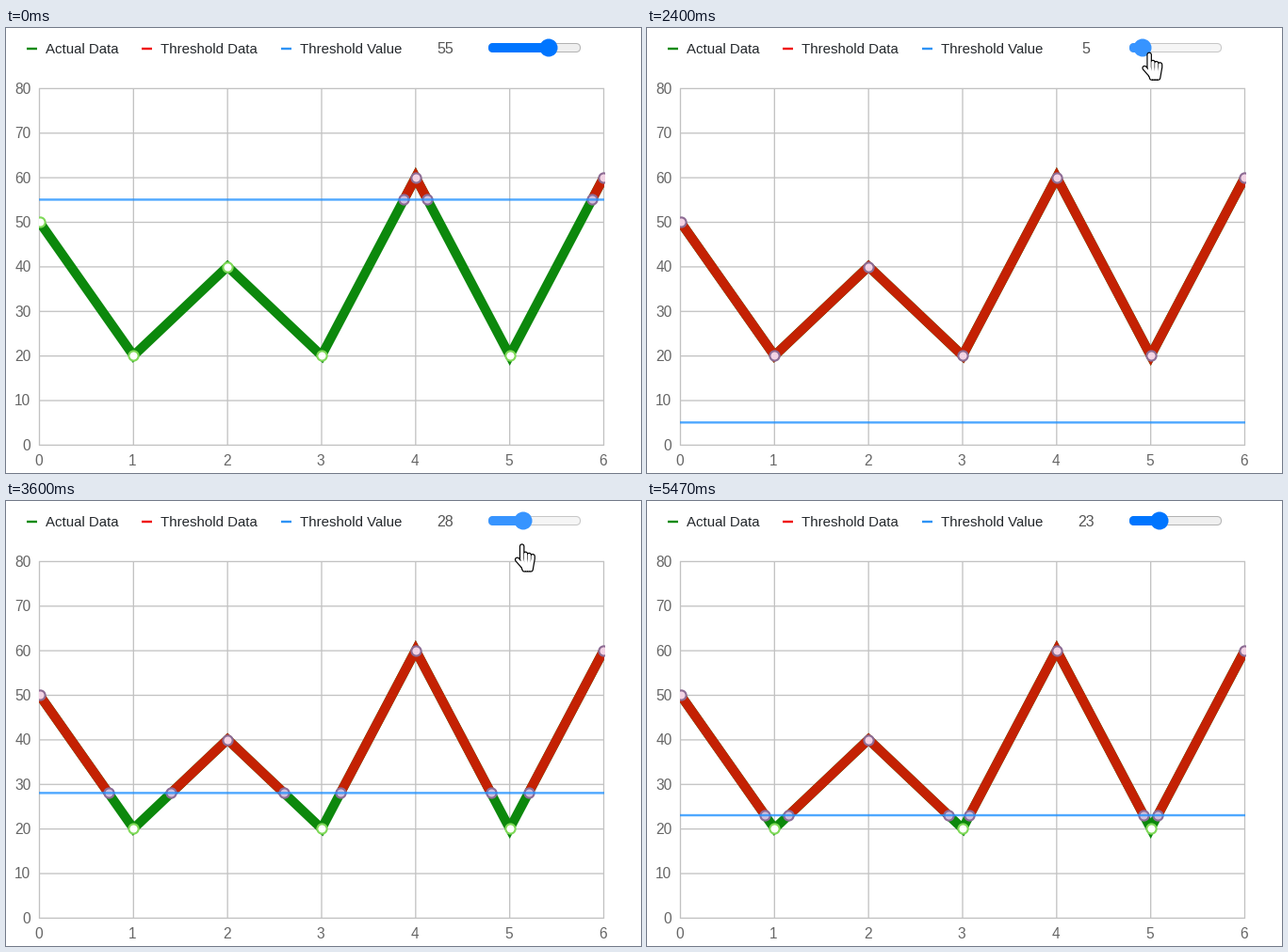
Write a matplotlib script that moves like this. It is 674 by 473 pixels and loops after 7140 ms.

```python
import numpy as np
import matplotlib.pyplot as plt
from matplotlib.animation import FuncAnimation
from matplotlib.patches import Circle, FancyBboxPatch, Polygon, Rectangle

WIDTH, HEIGHT, DPI = 674, 473, 100
LOOP_MS, INTERVAL = 7140, 30
PX = 72 / DPI

plt.rcParams["font.family"] = "Liberation Sans"
fig = plt.figure(figsize=(WIDTH / DPI, HEIGHT / DPI), dpi=DPI, facecolor="white")
ax = fig.add_axes([0, 0, 1, 1])
ax.set(xlim=(0, WIDTH), ylim=(HEIGHT, 0))
ax.axis("off")

DATA_Y = np.array([50, 20, 40, 20, 60, 20, 60])
DATA_X = np.arange(len(DATA_Y))

# The pointer is sampled 15 times per second; all times below are in these ticks
ENTER, HOVER, PRESS, RELEASE, LEAVE = 17, 20, 22, 80, 82
DRAG = [(23.2, 55), (34, 1), (34.7, 1), (43, 62), (46, 50), (48, 50), (58, 17),
        (63, 50), (65, 45), (68, 45), (72, 39), (76, 21), (77, 23)]
POINTER_Y = [(17, 44), (21, 22), (34, 23), (49, 42), (61, 50), (77, 58)]

BLUE, HOVER_BLUE, ACTIVE_BLUE = "#0075ff", "#005cc8", "#3794ff"
GREEN, RED, LINE_BLUE = "#0c880c", "#c42103", "#1e90ff"
GAP = (np.nan, np.nan)
ARROW = np.array([(0, 0), (0, 16), (4.5, 12.5), (12, 12)])


def px_x(x):
    return 35.5 + 99.83 * np.asarray(x, float)


def px_y(y):
    return 443 - 379 / 80 * np.asarray(y, float)


def line(x, y, color, width, **kw):
    kw = {"solid_capstyle": "butt", "solid_joinstyle": "miter", "snap": False, **kw}
    return ax.plot(x, y, color=color, lw=width * PX, **kw)[0]


def label(x, y, text, size, color, ha="center"):
    return ax.text(x, y, text, fontsize=size * PX, color=color, ha=ha, va="baseline")


def markers(edge, fill, z):
    return line([], [], edge, 0, ls="none", marker="o", ms=10.2 * PX, mew=2.1 * PX,
                mec=edge, mfc=fill, zorder=z)


# Legend
for x, color, text in ((22, "#0a8a0a", "Actual Data"), (144, "#f01010", "Threshold Data"),
                       (292, "#2e93f5", "Threshold Value")):
    line([x, x + 11], [22, 22], color, 2.4)
    label(x + 20.5, 27, text, 15, "#24282c", "left")
value_text = label(466, 27, "", 16, "#555555")

# Grid
for x in DATA_X:
    line([px_x(x)] * 2, [64, 444], "#c2c2c2", 1.3)
    label(px_x(x) - 1, 465, str(x), 15.5, "#666666")
for y in range(0, 81, 10):
    line([35, 635], [px_y(y) + .4] * 2, "#c2c2c2", 1.3)
    label(26.5, px_y(y) + 5.8, str(y), 15.5, "#666666", "right")

# Series
actual = line(px_x(DATA_X), px_y(DATA_Y), GREEN, 10, zorder=3)
above = line([], [], RED, 10, zorder=4)
low_dots = markers("#7fd958", "white", 5)
high_dots = markers("#8d6c94", "#f2d3e4", 6)
cross_dots = markers("#8d6c98", "#d2c0dc", 6)
threshold = line([35, 635], [0, 0], LINE_BLUE, 2.4, alpha=.78, zorder=7)
plot_area = Rectangle((35, 60), 599.5, 390, transform=ax.transData)
for artist in (actual, above, low_dots, high_dots, cross_dots):
    artist.set_clip_path(plot_area)


# Slider
def pill(width, z):
    return ax.add_patch(FancyBboxPatch(
        (512.5, 16.5), width, 9, boxstyle="round,pad=0,rounding_size=4.5", lw=PX, zorder=z))


track, progress = pill(97, 8), pill(50, 9)
thumb = ax.add_patch(Circle((0, 21), 9.5, lw=0, zorder=10))


# Pointer
def hand_strokes():
    """Four fingers that narrow to the wrist, and a thumb."""
    strokes = []
    for i in range(4):
        top = 9.8 + 1.2 * i if i else 2.8
        strokes += [(3.8 * i, top), (3.8 * i, 16), (2.5 + 2.3 * i, 27.5), GAP]
    return np.array(strokes + [(-5, 17), (2, 25)])


HAND = hand_strokes()
hand = [line([], [], color, width, solid_capstyle="round", solid_joinstyle="round", zorder=z)
        for color, width, z in (("black", 5.6, 12), ("white", 3.2, 13))]
arrow = ax.add_patch(Polygon(ARROW, fc="white", ec="black", lw=PX, zorder=12))


def eased(tick, keys):
    """Value between keys, slowing down at each of them."""
    times, values = np.array(keys).T
    i = np.clip(np.searchsorted(times, tick) - 1, 0, len(times) - 2)
    s = np.clip((tick - times[i]) / (times[i + 1] - times[i]), 0, 1)
    return values[i] + (values[i + 1] - values[i]) * (1 - np.cos(np.pi * s)) / 2


def thumb_x(value):
    return 521 + value


def pointer_at(tick):
    """Pointer tip; the thumb trails it slightly while dragging."""
    y = np.interp(tick, *np.transpose(POINTER_Y))
    if tick < PRESS:
        x = np.interp(tick, [ENTER, PRESS - 1], [643, 578])
    elif tick < RELEASE:
        x = thumb_x(eased(tick + .8, DRAG)) + 2
    else:
        x = np.interp(tick, [RELEASE, LEAVE - 1], [548, 592])
    return x, y


def split(value):
    """Polyline of the parts above the threshold, and the crossings."""
    path, crossings = [], []
    for i, y in enumerate(DATA_Y):
        if i and (DATA_Y[i - 1] > value) != (y > value):
            y0 = DATA_Y[i - 1]
            cross = (i - 1 + (value - y0) / (y - y0), value)
            crossings.append(cross)
            path += [cross] if y > value else [cross, GAP]
        if y > value:
            path.append((i, y))
    return np.array(path).reshape(-1, 2), np.array(crossings).reshape(-1, 2)


def place(artist, points):
    artist.set_data(px_x(points[:, 0]), px_y(points[:, 1]))


def draw_chart(value):
    path, crossings = split(value)
    points = np.column_stack([DATA_X, DATA_Y])
    place(above, path)
    place(cross_dots, crossings)
    place(low_dots, points[DATA_Y <= value])
    place(high_dots, points[DATA_Y > value])
    threshold.set_ydata([px_y(value)] * 2)
    value_text.set_text(str(value))


def draw_slider(value, tick):
    dragging = PRESS <= tick < RELEASE
    hovering = HOVER <= tick < PRESS
    color = ACTIVE_BLUE if dragging else HOVER_BLUE if hovering else BLUE
    track.set(fc="#f5f5f5" if dragging else "#efefef", ec="#c6c6c6" if dragging else "#b2b2b2")
    progress.set_width(thumb_x(value) - 512.5)
    progress.set(fc=color, ec=color)
    thumb.set(center=(thumb_x(value), 21), fc=color)


def draw_pointer(tick):
    is_hand = HOVER <= tick < RELEASE
    tip = pointer_at(tick)
    for stroke in hand:
        stroke.set_data(*(HAND + tip).T)
        stroke.set_visible(is_hand)
    arrow.set_xy(ARROW + tip)
    arrow.set_visible(ENTER <= tick < LEAVE and not is_hand)


def update(frame):
    tick = int((frame * INTERVAL + 25) * 15 / 1000)
    value = int(round(eased(tick, DRAG)))
    draw_chart(value)
    draw_slider(value, tick)
    draw_pointer(tick)
    return []


animation = FuncAnimation(fig, update, frames=LOOP_MS // INTERVAL, interval=INTERVAL,
                          repeat=True, repeat_delay=0, blit=False)
plt.show()
```
